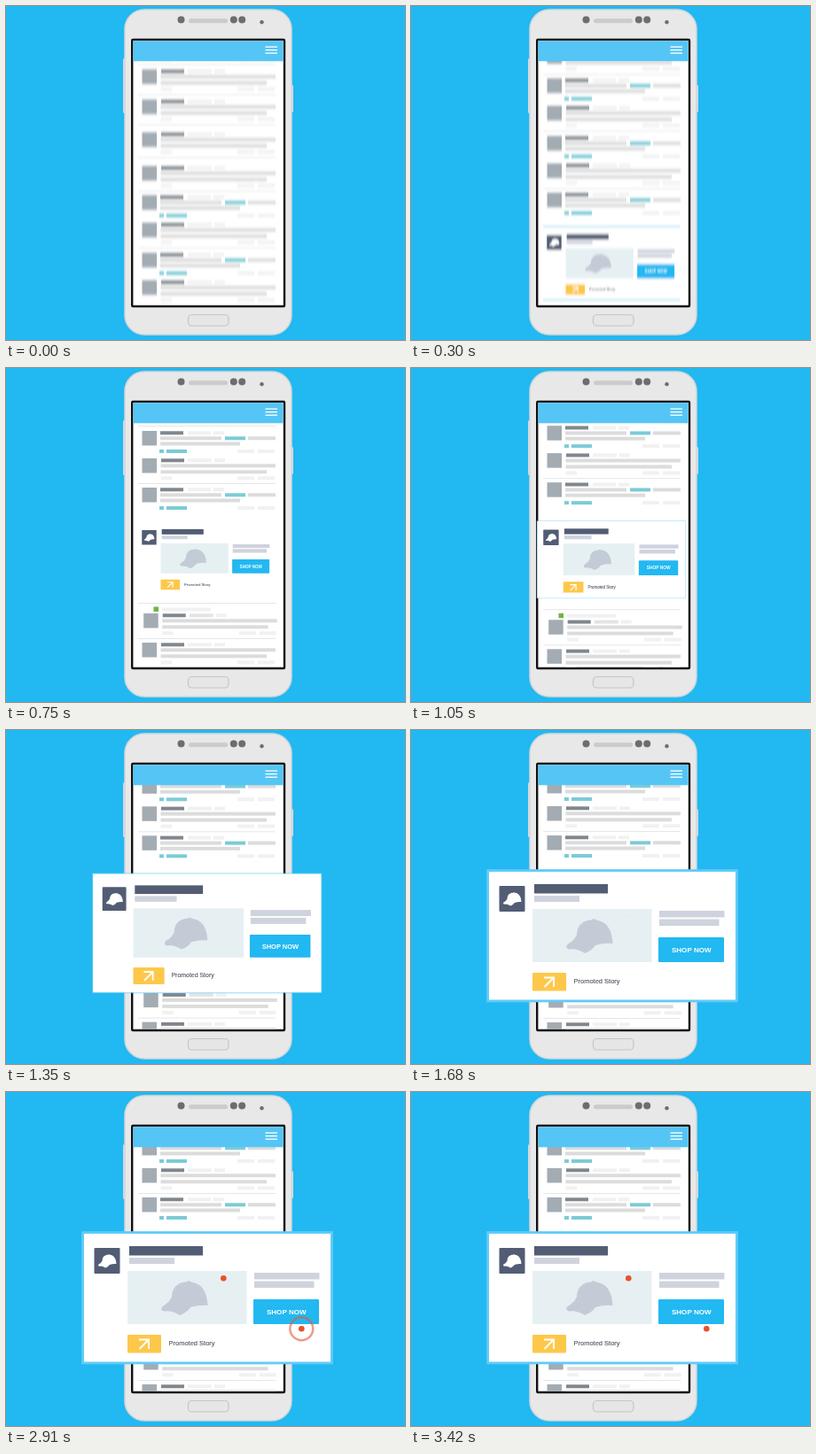
An HTML page for the animation above (8000 ms loop, 450 by 377 pixels).

```html
<!DOCTYPE html>
<html lang="en">
<head>
<meta charset="utf-8">
<title>Shop card on a phone</title>
<style>
html, body { margin: 0; width: 100%; height: 100%; overflow: hidden; background: #22b8f1; }
svg { display: block; width: 450px; height: 377px; }
text { font-family: "Liberation Sans", Arial, sans-serif; }
</style>
</head>
<body>
<svg id="stage" viewBox="0 0 450 377"></svg>
<script>
const LOOP = 8000, SCROLL = 208, SCROLL_TIME = 640;
const BLUE = '#22b8f1', GREY = '#dcdcdc', PALE = '#f1f1f1', TEAL = '#7ccbd6', NAVY = '#525d74', LILAC = '#cfd3dd';

const rect = (x1, y, x2, h, fill, more = '') =>
  `<rect x="${x1}" y="${y}" width="${x2 - x1}" height="${h}" fill="${fill}" ${more}/>`;
const bar = (x1, x2, y, fill) => rect(x1, y, x2, 4, fill);
const dot = (x, y, r, fill) => `<circle cx="${x}" cy="${y}" r="${r}" fill="${fill}"/>`;
const rule = y => rect(149, y, 304, 1, '#e6e6e6');

// One entry of the feed, drawn from the top edge of its avatar
function post(y, teal, dx = 0) {
  const d = teal ? 1 : 0;
  const head = rect(153.5, 0, 170, 16.5, '#a3acb3') + bar(175 - d, 201 - d, 0.3, '#80878d') +
    bar(205, 232 - d, 0.3, dx ? '#e4e4e4' : PALE) + bar(235 - d, 247 - d, 0.3, PALE);
  const feet = y => bar(261, 280, y, PALE) + bar(284, 303, y, PALE);
  const body = teal
    ? bar(174, 243, 6.3, GREY) + bar(247, 270, 6.3, TEAL) + bar(273, 304, 6.3, GREY) +
      bar(174, 264, 12.5, GREY) + bar(173, 178, 21, TEAL) + bar(181, 204, 21, TEAL) + feet(21)
    : bar(174.5, 304, 6.3, GREY) + bar(174.5, 294, 13.3, GREY) + bar(174.5, 187, 20.3, PALE) + feet(20.3);
  return `<g transform="translate(${dx} ${y})">${head}${body}</g>` + (teal ? '' : rule(y + 28));
}

const cap = `M187 231C187 220 195 214.5 203 214.5Q206 212 209 214.5C221 216 227 226 227.5 241
  Q218 240 208 243Q204 249 196 252Q187 246 178 247.5Q173 246 177 241.5Q184 238 187 231Z`;

const upper = [-170, -136, -102, -65, -27].map(y => post(y)).join('') +
  post(6, true) + post(37) + post(71, true) + post(102) + post(135, true);

const lower = rule(265) + rect(166.5, 269.5, 172, 5.5, '#6fb444') + bar(176, 231, 270.5, PALE) +
  post(277, false, 1.7) + post(310) + post(343);

const card =
  rect(99.5, 176, 128.5, 29, NAVY, 'rx="1"') +
  `<path d="${cap}" fill="#fff" transform="translate(114.3 190.6) scale(.39) translate(-201.5 -232)"/>` +
  rect(139, 174, 222, 10.5, NAVY) + rect(139, 187, 190, 7, LILAC) +
  rect(137, 202, 271.5, 60, '#e6f0f3') + `<path d="${cap}" fill="#c3ccd6"/>` +
  rect(280, 204, 353.5, 7.5, LILAC) + rect(280, 213.5, 347.5, 7.5, LILAC) +
  rect(279, 234, 353, 28, BLUE, 'rx="1"') +
  `<text x="316.3" y="251" font-size="8.1" font-weight="bold" fill="#fff" text-anchor="middle">SHOP NOW</text>` +
  rect(137, 274, 175, 20.5, '#fdc84a', 'rx="1"') +
  `<path d="M150 279.5H161V290M161 279.5L150.5 290" fill="none" stroke="#fff" stroke-width="2"/>` +
  `<text x="183.5" y="286.3" font-size="7.5" fill="#555c68" stroke="#555c68" stroke-width=".15">Promoted Story</text>`;

const click = id => `<g id="${id}"><circle fill="none" stroke="#e8583c"/><circle fill="#e9502c"/></g>`;

stage.innerHTML = `
<defs>
  <clipPath id="screen"><rect x="144" y="62" width="168.5" height="276"/></clipPath>
  <filter id="blur" filterUnits="userSpaceOnUse" x="100" y="-400" width="260" height="1100"><feGaussianBlur stdDeviation="0"/></filter>
</defs>
${rect(0, 0, 450, 377, BLUE)}
${rect(132, 59, 136, 62, '#d6dade', 'rx="1.5"')}${rect(320, 89, 324, 31, '#d6dade', 'rx="1.5"')}
${rect(134, 4, 322, 367, '#e8e8e8', 'rx="22" stroke="#cfd6da" stroke-width="1.5"')}
${dot(197.5, 15.5, 4, '#6c6d70')}${dot(256.8, 15.5, 4, '#6c6d70')}${dot(266.2, 15.5, 4, '#6c6d70')}${dot(288.5, 18.3, 2.2, '#6c6d70')}
${rect(206, 14.2, 250, 5, '#cbcbcb', 'rx="2.5"')}
${rect(205.5, 348.5, 251, 12.5, '#e6e6e6', 'rx="4" stroke="#c6c6c6" stroke-width="1.2"')}
${rect(142.2, 38, 314, 301, '#fff', 'rx="1" stroke="#111" stroke-width="2.4"')}
<g clip-path="url(#screen)"><g id="feed"><g id="upper">${upper}</g><g id="lower">${lower}</g></g></g>
${rect(143.5, 39.3, 312.7, 23, '#55c5f6')}
${[45.5, 49, 52.6].map(y => rect(292.5, y, 306, 1.3, '#fff')).join('')}
<g id="window"><g id="mover"><g id="card">
  <rect id="edge" fill="#62cbf7"/>${rect(88, 160, 366, 144.5, '#fff')}
  <g id="lines">${rect(92, 157, 364, 4, '#c4ebf7')}${rect(92, 303, 364, 4, '#c4ebf7')}</g>
  ${card}
</g></g></g>
${click('tapA')}${click('tapB')}`;

const $ = id => document.getElementById(id);
const set = (el, attrs) => { for (const k in attrs) el.setAttribute(k, attrs[k]); };
const ramp = (t, a, b) => Math.min(1, Math.max(0, (t - a) / (b - a)));
const smooth = (t, a, b) => { const u = ramp(t, a, b); return u * u * (3 - 2 * u); };

// Scroll progress: already moving at the start, at rest at the end
const START_SLOPE = 1.37;
const scrolled = t => {
  const u = ramp(t, 0, SCROLL_TIME);
  return START_SLOPE * u * (1 - u) ** 2 + u * u * (3 - 2 * u);
};
const speed = t => {
  const u = ramp(t, 0, SCROLL_TIME);
  return (START_SLOPE * (1 - u) * (1 - 3 * u) + 6 * u * (1 - u)) * SCROLL / SCROLL_TIME;
};

function drawTap(id, x, y, t, start) {
  const [ring, spot] = $(id).children, u = ramp(t, start, start + 750);
  set(ring, {
    cx: x, cy: y, r: 24 * (1 - (1 - u) ** 2),
    'stroke-width': Math.max(0.9, 4 - 4.7 * u),
    opacity: u > 0 ? Math.min(0.45 + 0.5 * u, 2.3 * (1 - u)) : 0
  });
  set(spot, { cx: x, cy: y, r: 3.3 * ramp(t, start, start + 120) });
}

function draw(t) {
  const shift = SCROLL * (1 - scrolled(t)), blur = 3.5 * speed(t);
  const open = smooth(t, 810, 1400);
  set($('feed'), { transform: `translate(0 ${shift})` });
  set($('upper'), { transform: `translate(0 ${-16 * open})` });
  set($('lower'), { transform: `translate(0 ${20 * open})` });
  set($('mover'), { transform: `translate(0 ${shift})` });
  set($('blur').firstElementChild, { stdDeviation: `0 ${blur}` });
  for (const id of ['feed', 'mover']) set($(id), { filter: blur > 0.05 ? 'url(#blur)' : 'none' });

  // The card grows past its size, then settles
  const pop = 1.06 * smooth(t, 960, 1520) - 0.06 * smooth(t, 1520, 1640);
  const scale = 0.5675 + 0.4325 * pop;
  set($('card'), {
    transform: `translate(${225.6 + 1.4 * pop} ${214.8 + 17.2 * pop}) scale(${scale}) translate(-227 -232)`
  });
  set($('window'), { 'clip-path': t < 800 ? 'url(#screen)' : 'none' });
  set($('lines'), { opacity: 1 - smooth(t, 350, 700) });
  const e = 1 + 1.8 * smooth(t, 1300, 1600);
  set($('edge'), {
    x: 88 - e, y: 160 - e, width: 278 + 2 * e, height: 144.5 + 2 * e,
    opacity: smooth(t, 930, 1050) * (0.6 + 0.4 * smooth(t, 1300, 1600))
  });

  drawTap('tapA', 245.3, 210.2, t, 1680);
  drawTap('tapB', 333.3, 267.3, t, 2670);
}

const begin = performance.now();
function tick() {
  draw((performance.now() - begin) % LOOP);
  requestAnimationFrame(tick);
}
tick();
</script>
</body>
</html>
```
